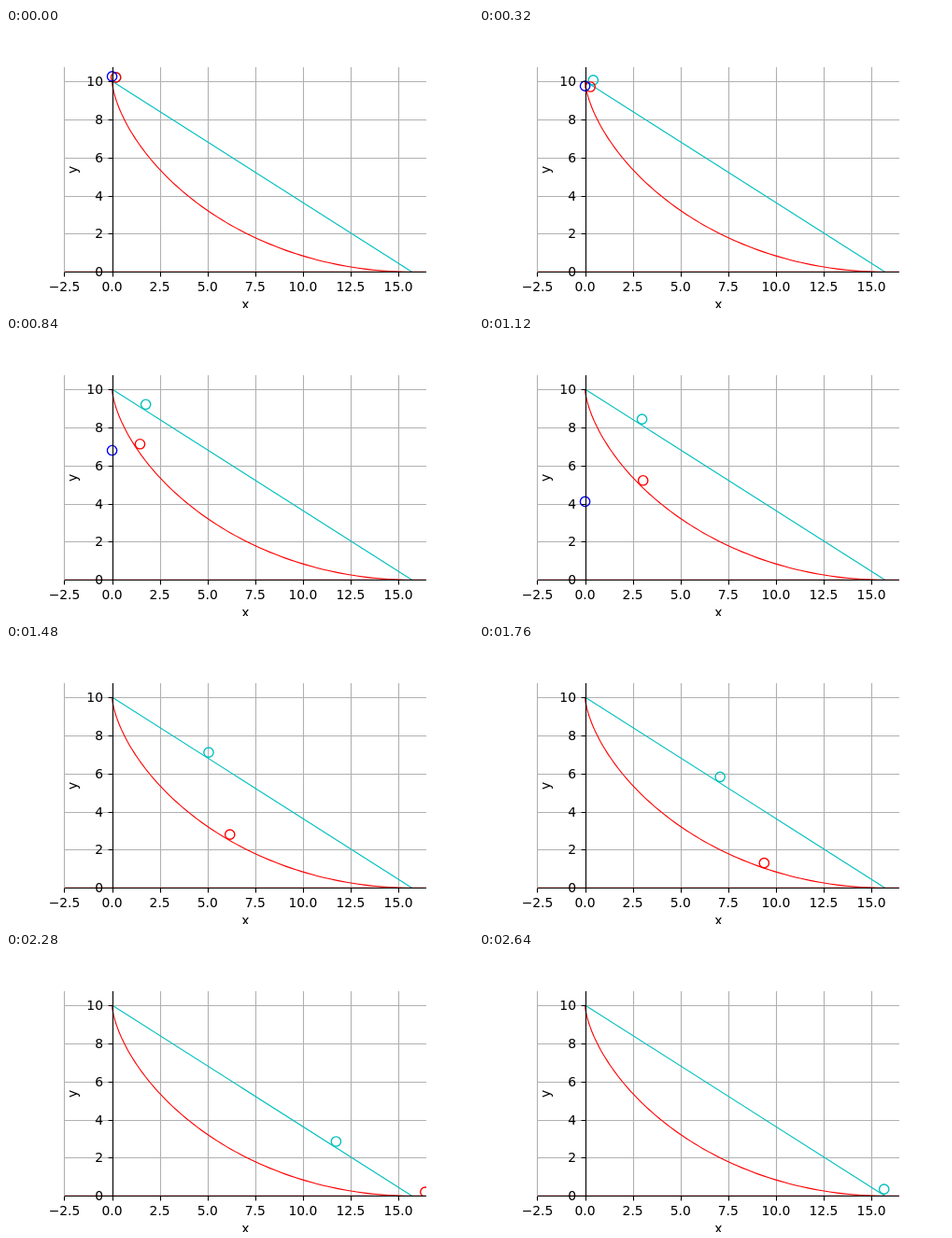
An HTML page that plays this animation: 500x300 px, repeating every 2680 ms.

```html
<!DOCTYPE html>
<html lang="en">
<head>
<meta charset="utf-8">
<title>Fastest descent</title>
<style>
html, body { margin: 0; width: 100%; height: 100%; overflow: hidden; background: #fff; }
svg { display: block; }
text { font: 13.89px "DejaVu Sans", sans-serif; fill: #000; }
path, circle { fill: none; }
.grid { stroke: #b0b0b0; stroke-width: 1.1; }
.axis { stroke: #000; stroke-width: 1.1; }
.curve { stroke-width: 1.1; }
.ball { stroke-width: 1.39; }
.red { stroke: #f00; }
.cyan { stroke: #00bfbf; }
.blue { stroke: #00f; }
.mid { text-anchor: middle; }
.end { text-anchor: end; }
</style>
</head>
<body>
<svg width="500" height="300" viewBox="0 0 500 300">
  <clipPath id="area"><rect x="62.5" y="42" width="387.5" height="219.4"/></clipPath>
  <path id="grid" class="grid"/>
  <g clip-path="url(#area)">
    <path id="ramp" class="curve cyan"/>
    <path id="cycloid" class="curve red"/>
    <circle id="slider" class="ball cyan" r="5.15"/>
    <circle id="roller" class="ball red" r="5.15"/>
    <circle id="faller" class="ball blue" r="5.15"/>
  </g>
  <path id="axes" class="axis"/>
  <g id="labels"></g>
  <text class="mid" x="256.3" y="301">x</text>
  <text class="mid" transform="translate(76.3 152) rotate(-90)">y</text>
</svg>
<script>
const $ = id => document.getElementById(id);
const SCALE = 20.43, G = 9.8, R = 5, H = 2 * R, END = Math.PI * R;
const STEP = 40, LOOP = 2680;
const px = x => 113.57 + x * SCALE;
const py = y => 261.3 - y * SCALE;
const snap = v => Math.floor(v + 0.5) + 0.5;

function label(text, x, y, cls) {
  const el = document.createElementNS("http://www.w3.org/2000/svg", "text");
  el.setAttribute("x", x);
  el.setAttribute("y", y);
  el.setAttribute("class", cls);
  el.textContent = text;
  $("labels").append(el);
}

const cycloid = a => [R * (a - Math.sin(a)), R * (1 + Math.cos(a))];

function drawPlot() {
  let grid = "", axes = "M114.5 42V262M63 261.5H450";
  for (let x = -2.5; x <= 15; x += 2.5) {
    const c = snap(px(x));
    grid += `M${c} 42V261`;
    axes += `M${c} 261.5V266.4`;
    label(x.toFixed(1).replace("-", "\u2212"), px(x), 282, "mid");
  }
  for (let y = 0; y <= H; y += 2) {
    const r = snap(py(y));
    grid += `M63 ${r}H450`;
    axes += `M109.6 ${r}H114.5`;
    label(y, 104, r + 4.7, "end");
  }
  $("grid").setAttribute("d", grid);
  $("axes").setAttribute("d", axes);

  const pts = [];
  for (let i = 0; i <= 100; i++) {
    const [x, y] = cycloid(Math.PI * i / 100);
    pts.push(`${px(x).toFixed(2)} ${py(y).toFixed(2)}`);
  }
  const floor = py(0);
  $("cycloid").setAttribute("d", `M${pts.join("L")}H450M62.5 ${floor}H450`);
  $("ramp").setAttribute("d", `M${px(0)} ${py(H)}L${px(END)} ${floor}`);
}

function place(id, x, y) {
  $(id).setAttribute("cx", px(x));
  $(id).setAttribute("cy", py(y));
}

function pose(t) {
  // free fall
  place("faller", 0, H + 0.25 - G * t * t / 2);

  // constant acceleration down the ramp
  const len = Math.hypot(H, END);
  const part = G * H / len * t * t / 2 / len;
  place("slider", 0.2 + END * part, 0.2 + H * (1 - part));

  // cycloid, then steady speed along the floor
  const w = Math.sqrt(G / R), a = w * t;
  const [x, y] = a < Math.PI ? cycloid(a) : [END + 2 * R * (a - Math.PI), 0];
  place("roller", x + 0.2, y + 0.2);
}

drawPlot();
pose(0);
const start = performance.now();
function tick() {
  const ms = (performance.now() - start) % LOOP;
  pose(Math.floor(ms / STEP) * STEP / 1000);
  requestAnimationFrame(tick);
}
requestAnimationFrame(tick);
</script>
</body>
</html>
```
